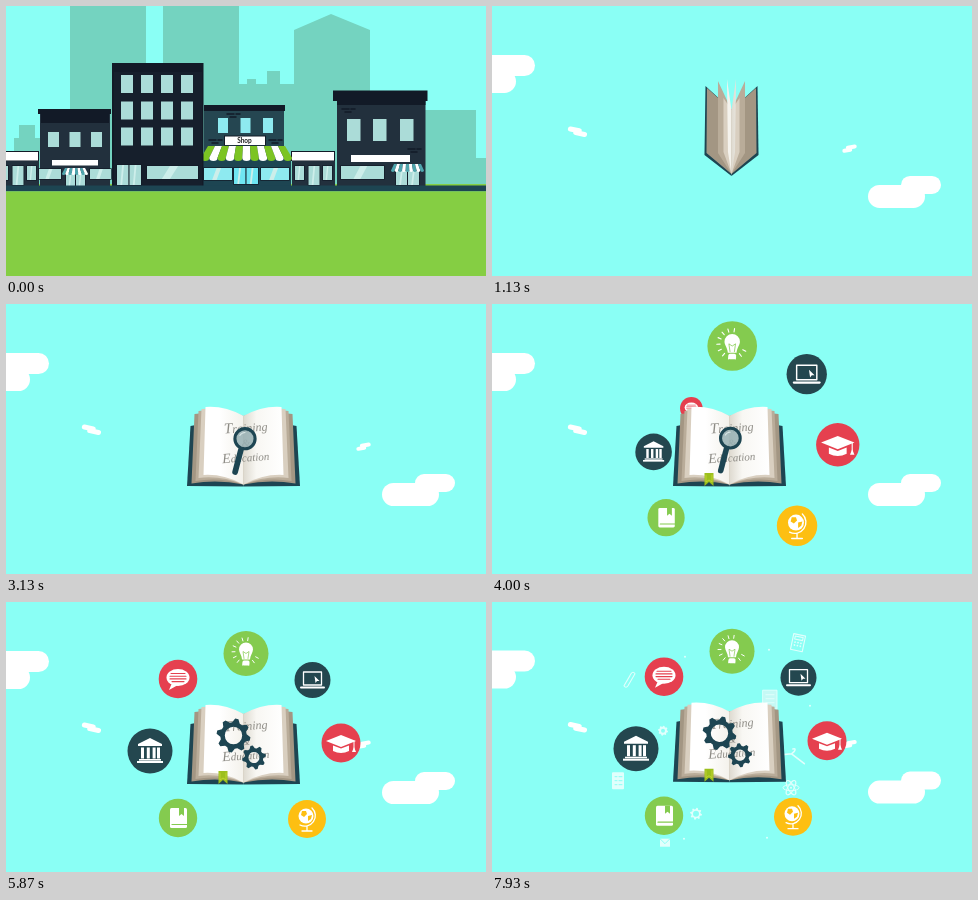
An HTML page that plays this animation: 480 px wide and 270 px high, repeating every 8000 ms.

```html
<!DOCTYPE html>
<html lang="en">
<head>
<meta charset="utf-8">
<title>Training &amp; Education</title>
<style>
html, body { margin: 0; width: 100%; height: 100%; overflow: hidden; background: #8afff5; }
svg { display: block; width: 100vw; height: 100vh; }
</style>
</head>
<body>
<svg id="stage" viewBox="0 0 480 270"></svg>
<script>
const LOOP = 8000, SHOTS = 9, SHUTTER = 17;
const SKY = '#8afff5', INK = '#1d4552', WALL = '#22303d', DARK = '#121a27', GLASS = '#abdcd8', WHITE = '#fff';
const stage = document.getElementById('stage');

// Easing
const clamp = v => Math.max(0, Math.min(1, v));
const span = (t, a, b) => clamp((t - a) / (b - a));
const lerp = (a, b, k) => a + (b - a) * k;
const outCubic = k => 1 - (1 - k) ** 3;
const inOut = k => k < .5 ? 4 * k ** 3 : 1 - 4 * (1 - k) ** 3;
const inOutQuint = k => k < .5 ? 16 * k ** 5 : 1 - 16 * (1 - k) ** 5;
const outBack = k => 1 + 2.9 * (k - 1) ** 3 + 1.9 * (k - 1) ** 2;

// Markup helpers
const box = (x, y, w, h, fill, r = 0) => `<rect x="${x}" y="${y}" width="${w}" height="${h}" rx="${r}" fill="${fill}"/>`;
const dot = (x, y, r, fill) => `<circle cx="${x}" cy="${y}" r="${r}" fill="${fill}"/>`;
const shape = (d, fill) => `<path d="${d}" fill="${fill}" fill-rule="evenodd"/>`;
const line = (d, w = 1, color = WHITE) =>
  `<path d="${d}" fill="none" stroke="${color}" stroke-width="${w}" stroke-linecap="round" stroke-linejoin="round"/>`;
const group = (id, body, attrs = '') => `<g id="${id}" ${attrs}>${body}</g>`;
const range = n => [...Array(n).keys()];

function pane(x, y, w, h, fill = GLASS) {
  const shine = `M${x + w * .45} ${y}h${w * .16}L${x + w * .45} ${y + h}h${-w * .16}z`;
  return box(x - .7, y - .7, w + 1.4, h + 1.4, DARK) + box(x, y, w, h, fill) + shape(shine, '#cdeeea');
}
const panes = (xs, y, w, h, fill) => xs.map(x => pane(x, y, w, h, fill)).join('');
const windows = (xs, y, w, h, fill = GLASS) => xs.map(x => box(x, y, w, h, fill)).join('');
const door = (x, y, w, h, fill) => panes([x, x + w / 2 + .5], y, w / 2 - .5, h, fill);

function awning(x, y, w, h, n, inset, color) {
  const s = w / n, top = (w - 2 * inset) / n;
  return range(n).map(i => {
    const a = x + i * s, b = x + inset + i * top;
    return shape(`M${b} ${y}h${top}L${a + s} ${y + h - s * .4}a${s / 2} ${s * .4} 0 0 1 ${-s} 0z`, i % 2 ? WHITE : color);
  }).join('');
}

const bricks = (x, y) => line(`M${x} ${y}h7m2 0h4M${x + 3} ${y + 3}h6`, 1.5, DARK);

function skyline() {
  const blocks = [[64, -24, 76], [70, -32, 18], [112, -32, 22], [157, -16, 76], [164, -22, 14], [210, -22, 18],
    [233, 78, 56], [241, 73, 9], [261, 65, 13], [415, 104, 55], [468, 152, 24], [492, 131, 90], [8, 132, 27], [13, 119, 16]];
  return blocks.map(([x, y, w]) => box(x, y, w, 182 - y, '#74d3c0')).join('')
    + shape('M288 182V24L325 8L364 24V182z', '#74d3c0');
}

function kiosk(x, w) {
  return box(x, 148, w, 33, WALL) + box(x - 1, 145, w + 1, 10, DARK) + box(x, 146, w - 1, 8.5, WHITE)
    + panes([x + 3, x + w - 12], 160, 9, 14) + pane(x + w / 2 - 5, 160, 11, 19);
}

function city() {
  const tree = x => box(x - 2, 160, 4, 22, '#6b5a44') + dot(x, 162, 14, '#3fbf4d');
  return box(-600, -1200, 1800, 1800, SKY) + skyline() + box(-200, 178, 900, 3, '#85ce43')
    + tree(-28) + tree(510) + kiosk(-10, 43) + kiosk(286, 43)
    // low house
    + box(34, 106, 70, 75, WALL) + box(32, 103, 73, 5, DARK) + box(35, 108, 68, 9, DARK)
    + windows([42, 63.5, 85], 126, 11, 15) + box(46, 154, 46, 5.5, WHITE)
    + pane(33, 163, 22, 10) + pane(84, 163, 21, 10) + door(60, 167, 19, 13)
    + awning(56, 162, 26, 7, 8, 3, '#4fa5ad')
    // shop
    + box(198, 102, 80, 79, '#254651') + box(198, 99, 81, 6, DARK) + bricks(221, 108) + bricks(203, 134) + bricks(263, 134)
    + windows([212, 234.5, 257], 112, 10, 15, '#8eeaf0') + box(218, 129.5, 42, 10, DARK) + box(219, 130.5, 40, 8.5, WHITE)
    + `<text x="238.5" y="136.6" font-family="Lato, sans-serif" font-size="6.5" font-weight="700" text-anchor="middle" fill="#222">Shop</text>`
    + box(197, 153, 88, 27, INK) + pane(198, 162, 28, 12, '#8eeaf0') + pane(255, 162, 28, 12, '#8eeaf0')
    + door(228, 162, 24, 16, '#6fe6f2') + awning(195, 140, 91, 15, 11, 7, '#7cc423')
    // tall block
    + box(106, 57, 91.5, 124, DARK) + box(108, 66, 88, 114, '#161f2c')
    + [69, 95.5, 121.5].map(y => windows([115, 135, 155, 175], y, 12, 18)).join('')
    + door(111, 159, 24, 20) + pane(141, 160, 51, 13)
    // corner house
    + box(331, 88, 88.5, 93, WALL) + box(327, 84.5, 94.5, 10.5, DARK) + box(331, 95, 88.5, 4, DARK)
    + bricks(336, 103) + bricks(402, 143) + windows([341, 367, 394], 113, 13.5, 22)
    + box(345, 149, 59, 7, WHITE) + pane(335, 160, 43, 13) + door(390, 165, 23, 14)
    + awning(385, 158, 33, 8, 9, 3, '#4fa5ad')
    + box(-200, 179.5, 900, 6, INK) + box(-200, 185.3, 900, 400, '#85ce43');
}

function gear(n, R, r, hole) {
  const pts = range(n * 4).map(i => {
    const a = (i + .5) / (n * 4) * 2 * Math.PI, q = i % 4 < 2 ? R : r;
    return `${(q * Math.cos(a)).toFixed(2)} ${(q * Math.sin(a)).toFixed(2)}`;
  });
  return `M${pts.join('L')}zM${hole} 0A${hole} ${hole} 0 1 0 ${-hole} 0A${hole} ${hole} 0 1 0 ${hole} 0z`;
}

// Clouds: rest place, offset and extra size while the camera is below
const pill = (x, y, w, h) => box(x, y, w, h, WHITE, h / 2);
const clouds = [
  { x: 0, y: 68, dx: -110, dy: -260, s: .5, body: pill(-30, -19, 73, 21) + pill(-40, -4, 64, 23) },
  { x: 412, y: 186, dx: 150, dy: -330, s: .5, body: pill(-3, -16, 40, 18) + pill(-36, -7, 57, 23) },
  { x: 85.5, y: 125.5, dx: 269, dy: -179, s: 1.6, rot: 12, body: pill(-10, -3.5, 14, 5) + pill(-4, -1, 14, 5) },
  { x: 357, y: 142.5, dx: 67, dy: -194, s: .3, rot: -10, body: pill(-3, -3, 11, 4) + pill(-7, -.5, 10, 4) }
];

// Round badges
const GREEN = '#84cb4f', RED = '#e5404f', NAVY = '#24474f', GOLD = '#fdbf12';
const rays = range(11).map(i => {
  const a = (i - 13.25) * Math.PI / 7.2, c = Math.cos(a), s = Math.sin(a);
  return `M${11 * c} ${11 * s - 2}L${14 * c} ${14 * s - 2}`;
}).join('');
const badges = [
  { x: 240, y: 51.5, r: 22.5, color: GREEN, body: line(rays, 1)
    + shape('M-4 6C-4 2-7-1-7-4A7 7 0 0 1 7-4C7-1 4 2 4 6z', WHITE) + box(-3.5, 7, 7, 5, WHITE, 1.5)
    + line('M-2 5L-3-2L0 0L3-2L2 5', .7, GREEN) },
  { x: 306.5, y: 78, r: 18, color: NAVY, body: line('M-9-8H9V5H-9z', 1.3) + box(-12.5, 6.5, 25, 2, WHITE, 1)
    + shape('M2-4L7 1L4.5 1L3 3z', WHITE) },
  { x: 335, y: 141, r: 19.5, color: RED, body: shape('M-15-2L0-8L15-2L0 4z', WHITE)
    + shape('M-8 2.5L0 5.5L8 2.5V8Q0 12-8 8z', WHITE) + line('M13-2V6', 1) + shape('M13 4l2 5h-4z', WHITE) },
  { x: 301, y: 217, r: 19, color: GOLD, body: dot(-1, -3, 7.5, WHITE)
    + shape('M-5-8l4 0l1 3l-3 3l-3-2zM1-3l4-1l-1 4l-3 2z', GOLD) + line('M5-11A10.5 10.5 0 0 1-7 6M0 8V11M-5 12H5', 1.3) },
  { x: 172, y: 216, r: 19.2, color: GREEN, body: box(-8, -10, 17, 20, WHITE, 1.5) + line('M-6 6.5H9', 1.2, GREEN)
    + shape('M1-10h5v8l-2.5-2l-2.5 2z', GREEN) },
  { x: 144, y: 149, r: 22.5, color: NAVY, body: shape('M-12-7L0-13L12-7V-5H-12z', WHITE)
    + [-9, -3.2, 2.6, 7].map(x => box(x, -3.5, 3, 11, WHITE)).join('') + box(-11, 8, 22, 1.6, WHITE) + box(-13, 10, 26, 2, WHITE) },
  { x: 172, y: 77, r: 19.3, color: RED, body: shape('M-6 4L-9 11L0 6z', WHITE)
    + `<ellipse cy="-1.5" rx="11.5" ry="8.5" fill="#fff"/>` + line('M-7-5.5H7M-8-2.8H8M-8-.1H8M-6 2.6H6', 1.1, RED) }
];

// Faint line drawings around the book
const speck = dot(0, 0, 1, WHITE);
const doodles = [
  [136, 80, line('M-4 6L3-6Q5-9 7-6L0 6Q-2 9-4 6L2-4', 1.1)],
  [306, 43, `<g transform="rotate(12)">${line('M-6-8H6V8H-6zM-4-6H4V-3H-4z', 1.1)}${line('M-3 0h0m3 0h0m3 0h0M-3 3h0m3 0h0m3 0h0', 1.8)}</g>`],
  [278, 100, box(-7, -9.5, 14, 19, '#d9f8f6') + line('M-7-9.5H7V9.5H-7zM-4-5H4M-4-1H4M-4 3H4', .9)],
  [299, 156, `<g transform="rotate(16)">${line('M0-7Q3-9 2-5L0-2L-15 4M0-2L15 4', 1.6)}</g>`],
  [299, 188, [0, 60, 120].map(a => `<ellipse rx="8" ry="3" transform="rotate(${a})" fill="none" stroke="#fff"/>`).join('') + speck],
  [204, 214, shape(gear(8, 6, 4.5, 3), WHITE)],
  [171, 131, shape(gear(8, 5, 4, 2), WHITE)],
  [173, 243, box(-5, -4, 10, 8, WHITE) + line('M-5-4L0 1L5-4', 1, SKY)],
  [126, 181, box(-6, -8.5, 12, 17, WHITE, 1) + line('M-3-4h2m2 0h3M-3 0h2m2 0h3M-3 4h2m2 0h3', 1, SKY)],
  [318, 106, speck], [192, 239, speck], [275, 238, speck], [193, 57, speck], [277, 50, speck]
];

// Leaves of one side: half-open top and bottom corner, then the same when open
const leaves = [
  { from: [26, 80, 27, 149], to: [53, 122, 56.5, 182], fill: INK, bulge: 0, foot: 2 },
  { from: [24.5, 82, 25, 147], to: [49, 110, 52, 179.5], fill: '#a39683', bulge: 5, foot: 0 },
  { from: [13.5, 75, 13.5, 147], to: [45, 107, 48, 177], fill: '#b9ac99', bulge: 6, foot: 0 },
  { from: [8, 92, 8, 146], to: [42, 105, 45, 174], fill: '#d9cfc0', bulge: 6, foot: 0 },
  { from: [4.5, 73, 3.5, 146], to: [38, 103, 40, 171], fill: 'url(#paper)', bulge: 6, foot: 0 }
];

function leafPath(leaf, side, open) {
  const [tx, ty, bx, by] = leaf.from.map((v, i) => lerp(v, leaf.to[i], open));
  const top = lerp(104, 112, open), foot = lerp(168, 180.5, open) + leaf.foot, up = leaf.bulge * open;
  return `M0 ${top}Q${side * tx / 2} ${(top + ty) / 2 - up} ${side * tx} ${ty}L${side * bx} ${by}`
    + `Q${side * bx / 2} ${(foot + by) / 2 - up} 0 ${foot}z`;
}

const word = (first, rest, y, size) =>
  `<text x="240" y="${y}" font-size="${size}" text-anchor="middle" transform="rotate(-4 240 ${y})"><tspan font-size="${size + 3}">${first}</tspan>${rest}</text>`;
const sheets = leaves.map((leaf, i) => [-1, 1].map(s => `<path id="leaf${i}${s}" fill="${leaf.fill}"/>`).join('')).join('');

stage.innerHTML = `
<defs>
  <linearGradient id="paper" gradientUnits="userSpaceOnUse" x1="-40" x2="40" y1="0" y2="0">
    <stop offset=".2" stop-color="#fff"/><stop offset=".49" stop-color="#f4f2ec"/>
    <stop offset=".5" stop-color="#dedad0"/><stop offset=".66" stop-color="#f8f7f3"/><stop offset="1" stop-color="#fff"/>
  </linearGradient>
  <filter id="blur" filterUnits="userSpaceOnUse" x="-20" y="-40" width="520" height="350"><feGaussianBlur id="soft" stdDeviation="0 0"/></filter>
  <clipPath id="reveal"><rect id="wipe" x="210" y="100" height="80"/></clipPath>
  ${group('city', city())}
</defs>
${box(0, 0, 480, 270, SKY)}
${range(SHOTS).map(i => `<use id="shot${i}" href="#city" opacity="${1 / (i + 1)}"/>`).join('')}
${group('sky', clouds.map((c, i) => group('cloud' + i, c.body)).join(''))}
${group('main',
  group('doodles', doodles.map((d, i) => group('doodle' + i, d[2])).join(''))
  + badges.map((b, i) => group('badge' + i, dot(0, 0, b.r, b.color) + b.body)).join('')
  + group('book', sheets)
  + group('ribbon', shape('M-4.5 0H4.5V13L0 9L-4.5 13z', '#9cbf1d') + line('M-3 2V9L0 7L3 9V2', .8, '#c9d936'))
  + group('words', word('T', 'raining', 128, 12) + word('&amp;', '', 143, 8) + word('E', 'ducation', 157.5, 11),
    'clip-path="url(#reveal)" fill="#8d8b85" font-family="Liberation Serif, serif" font-style="italic"')
  + group('lens', line('M-4 11L-9.5 32', 5.5, INK) + dot(0, 0, 9.5, 'rgba(150,176,180,.85)')
    + `<circle r="9.7" fill="none" stroke="${INK}" stroke-width="3"/>` + line('M-5-3A6 6 0 0 1 0-6', 1, '#d8e6e6'))
  + group('gearA', shape(gear(8, 17, 13.2, 8.7), INK))
  + group('gearB', shape(gear(8, 12, 9.3, 5.6), INK)))}`;

const el = {};
stage.querySelectorAll('[id]').forEach(n => el[n.id] = n);
function place(id, x, y, s = 1, rot = 0, sx = s) {
  el[id].setAttribute('transform', `translate(${x} ${y}) rotate(${rot}) scale(${sx} ${s})`);
}
const show = (id, on) => el[id].setAttribute('visibility', on ? 'visible' : 'hidden');

// The camera rises; averaged shots within the shutter time give the motion blur
function drawPan(t, lift) {
  const pan = time => inOutQuint(span(time, 70, 1235));
  const p = pan(t), q = 1 - p;
  const moving = p > 1e-4 && p < .9;
  range(SHOTS).forEach(i => {
    const at = moving ? pan(t + (i / (SHOTS - 1) - .5) * SHUTTER) : p;
    place('shot' + i, 74 * at, 450 * at, 1 - .585 * at);
    show('shot' + i, p < .9 && (moving || i === 0));
  });
  clouds.forEach((c, i) => place('cloud' + i, c.x + q * c.dx, c.y + q * c.dy - lift * .2, 1 + q * c.s, c.rot || 0));
  const v = 240 * (pan(t + SHUTTER / 2) - pan(t - SHUTTER / 2));
  el.soft.setAttribute('stdDeviation', `${v * .3} ${v * .3}`);
  if (v > .3) el.sky.setAttribute('filter', 'url(#blur)');
  else el.sky.removeAttribute('filter');
}

function drawBook(t) {
  const drop = outCubic(span(t, 800, 1110)), open = inOut(span(t, 1090, 1850));
  show('book', t > 800);
  place('book', lerp(239.5, 237.5, open), lerp(-190, 0, drop), 1, 0, lerp(.2, 1, drop));
  leaves.forEach((leaf, i) => [-1, 1].forEach(s => el[`leaf${i}${s}`].setAttribute('d', leafPath(leaf, s, open))));
  el.wipe.setAttribute('width', 60 * span(t, 1900, 2600));
  const hang = outBack(span(t, 3600, 3950));
  show('ribbon', t > 3600);
  place('ribbon', 217, 169, Math.max(.01, hang), 0, 1);
}

function drawTools(t) {
  const size = outBack(span(t, 2650, 3050)) * (1 - inOut(span(t, 4900, 5150)));
  const rest = span(t, 3130, 4530);
  show('lens', size > .01);
  place('lens', lerp(239, 238, rest), lerp(134.7, 133.8, rest), size * lerp(1.04, 1, rest));
  const a = outBack(span(t, 5100, 5450)), b = outBack(span(t, 5200, 5550));
  const turn = (t - 5870) * .045;
  show('gearA', a > .01);
  show('gearB', b > .01);
  place('gearA', 227.5, 133.5, a, turn);
  place('gearB', 248, 155.5, b, 22 - turn * 1.4);
}

function drawBadges(t) {
  badges.forEach((b, i) => {
    const start = 3500 + i * 65, k = outBack(span(t, start, start + 750));
    show('badge' + i, t > start);
    place('badge' + i, lerp(238, b.x, k), lerp(143, b.y, k), Math.max(0, k));
  });
}

function drawDoodles(t) {
  doodles.forEach(([x, y], i) => {
    const start = 5920 + i * 70, k = outCubic(span(t, start, 7930));
    const node = el['doodle' + i];
    node.setAttribute('opacity', .75 * span(t, start, start + 400));
    place('doodle' + i, lerp(238, x, .55 + .45 * k), lerp(143, y, .55 + .45 * k), .4 + .6 * k, -25 * (1 - k));
  });
}

function draw(t) {
  const lift = 2.3 * span(t, 7800, 7930);
  drawPan(t, lift);
  drawBook(t);
  drawTools(t);
  drawBadges(t);
  drawDoodles(t);
  place('main', 0, -lift);
}

const begin = performance.now();
function tick() {
  draw((performance.now() - begin) % LOOP);
  requestAnimationFrame(tick);
}
tick();
</script>
</body>
</html>
```
